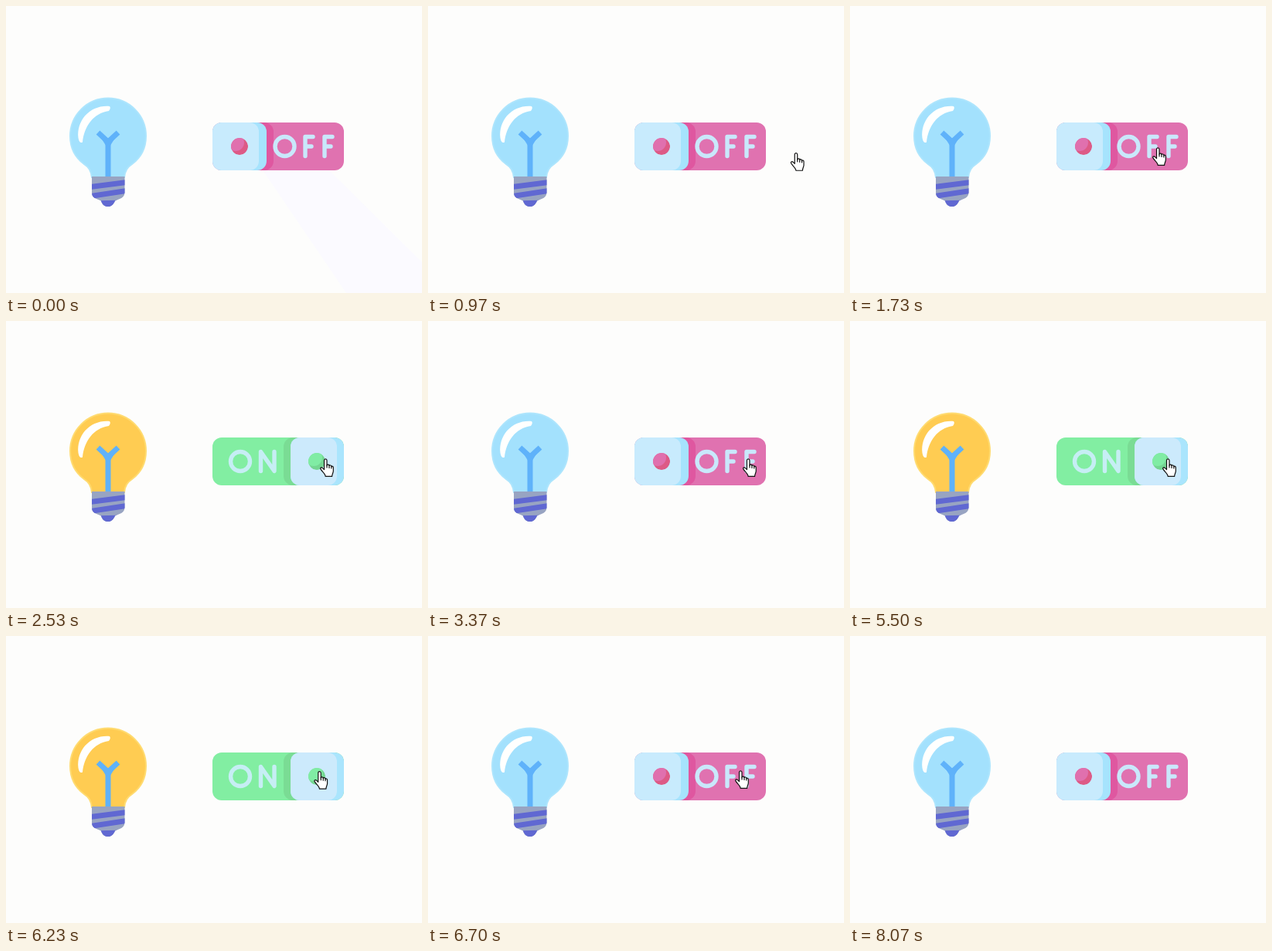
Animation, 538 px wide and 372 px high, one loop 8.11 s. Source, as an HTML page:

```html
<!DOCTYPE html>
<html lang="en">
<head>
<meta charset="utf-8">
<title>Light switch</title>
<style>
  html, body { margin: 0; width: 100%; height: 100%; overflow: hidden; background: #fdfdfc; }
  svg { display: block; width: 538px; height: 372px; }
  .letters { fill: none; stroke-width: 5.4; stroke-linecap: round; stroke-linejoin: round; }
</style>
</head>
<body>
<svg viewBox="0 0 538 372">
  <defs>
    <clipPath id="pill"><rect x="267" y="151" width="170" height="62" rx="12"/></clipPath>
    <clipPath id="base"><path d="M111 221H153.500V242Q153 248 147 250L141 252.500Q138 260 132 260Q125 260 123 252.500L117 250Q111 248 111 242Z"/></clipPath>
    <clipPath id="dotOff"><circle cx="302" cy="182" r="11"/></clipPath>
    <clipPath id="dotOn"><circle cx="402" cy="182" r="11"/></clipPath>
  </defs>

  <path id="shade" fill="#fbfaff" d="M332 213H418L538 332V372H440Z"/>

  <g id="bulb">
    <path id="glass" stroke-width="2" d="M111 222C110 213 107 209 101 205C89 196 83 184 83 168.500A49 49 0 0 1 181 168.500C181 184 175 196 163 205C157 209 154 213 153 222Z"/>
    <path fill="#fffffe" d="M134 130C109 128 91 148 93.500 171Q95 179 99 176.500C101 156 113 139 133 136Q136 132 134 130Z"/>
    <path fill="none" stroke="#5fb2fa" stroke-width="7" d="M132 222V176M119 164L132 176L145 164"/>
    <path fill="#5fb2fa" d="M123 171H141L133 184H131Z"/>
    <g clip-path="url(#base)">
      <path fill="#98a4c2" d="M110 221H155V262H110Z"/>
      <path fill="#6068d2" d="M110 231L155 225V232L110 238ZM110 243L155 236V243L110 250ZM110 252.500L155 251.500V264H110Z"/>
    </g>
  </g>

  <g id="off" clip-path="url(#pill)">
    <rect x="300" y="151" width="137" height="62" fill="#e072b0"/>
    <rect x="255" y="151" width="91" height="62" rx="12" fill="#df57a0"/>
    <rect x="255" y="151" width="82" height="62" rx="12" fill="#a6e3fd"/>
    <rect x="255" y="151" width="72" height="62" rx="12" fill="#c8ebfd"/>
    <g clip-path="url(#dotOff)">
      <circle cx="302" cy="182" r="11" fill="#dd5a86"/>
      <circle cx="297" cy="177" r="11" fill="#e070ae"/>
    </g>
    <g class="letters" stroke="#c9e8fb">
      <circle cx="360.500" cy="182" r="12.500"/>
      <path d="M397 169.500H387V194.500M387 182H395M422 169.500H412V194.500M412 182H420"/>
    </g>
  </g>

  <g id="on" clip-path="url(#pill)">
    <rect x="267" y="151" width="130" height="62" fill="#82eea2"/>
    <rect x="359" y="151" width="91" height="62" rx="12" fill="#7adc94"/>
    <rect x="368" y="151" width="80" height="62" rx="12" fill="#aae5fd"/>
    <rect x="368" y="151" width="60" height="62" rx="12" fill="#cceafc"/>
    <g clip-path="url(#dotOn)">
      <circle cx="402" cy="182" r="11" fill="#74d692"/>
      <circle cx="398" cy="177" r="11" fill="#80eca4"/>
    </g>
    <g class="letters" stroke="#c6eef4">
      <circle cx="303" cy="182" r="12.500"/>
      <path d="M329.500 194.500V169.500L347 194.500V169.500"/>
    </g>
  </g>

  <g id="hand" fill="#fff" stroke="#111" stroke-width="1.200" stroke-linejoin="round" stroke-linecap="round">
    <path d="M5.500 2.800C5.500 .2 9 .2 9 2.800V9.200C9.300 7.600 12 7.800 12 9.600C12.400 8.400 14.800 8.800 14.800 10.600C15.300 9.800 17.300 10.200 17.300 12V16.500C17.300 18.600 15.800 20 15.600 23.400H7.200C7 20.500 3.500 18 1 14.200C-.2 12.200 2 11.200 3.500 12.600L5.500 14.600Z"/>
    <path fill="none" d="M9 9V12M12 9.600V12.500M14.800 10.600V13"/>
  </g>
</svg>
<script>
  const LOOP = 8110;
  const CLICKS = [1830, 3270, 5000, 6600];
  // time, x, y of the pointer
  const PATH = [
    [570, 539, 196], [1400, 391, 183], [1830, 391, 183],
    [2500, 406, 178], [3170, 407, 178], [4700, 406, 178],
    [5500, 404, 178], [6500, 397, 174], [7330, 397, 174], [8060, 440, -26]
  ];
  const get = id => document.getElementById(id);
  const [glass, on, off, hand, shade] = ['glass', 'on', 'off', 'hand', 'shade'].map(get);
  const show = (el, visible) => el.setAttribute('visibility', visible ? 'visible' : 'hidden');
  const ease = p => p * p * (3 - 2 * p);

  function pointer(t) {
    const i = PATH.findIndex(k => k[0] > t);
    if (i < 1) return null;
    const [t0, x0, y0] = PATH[i - 1], [t1, x1, y1] = PATH[i];
    const p = ease((t - t0) / (t1 - t0));
    return [x0 + (x1 - x0) * p, y0 + (y1 - y0) * p];
  }

  function draw(t) {
    const lit = CLICKS.filter(c => c <= t).length % 2 === 1;
    show(on, lit);
    show(off, !lit);
    glass.setAttribute('fill', lit ? '#ffcc52' : '#a3e1fd');
    glass.setAttribute('stroke', lit ? '#ffdb70' : '#ade5fd');
    shade.setAttribute('opacity', t < 30 ? 1 : t < 60 ? 0.6 : t < 100 ? 0.3 : 0);
    const pos = pointer(t);
    show(hand, pos);
    if (pos) hand.setAttribute('transform', `translate(${pos[0].toFixed(2)} ${pos[1].toFixed(2)})`);
  }

  const start = performance.now();
  function tick() {
    draw((performance.now() - start) % LOOP);
    requestAnimationFrame(tick);
  }
  draw(0);
  requestAnimationFrame(tick);
</script>
</body>
</html>
```
